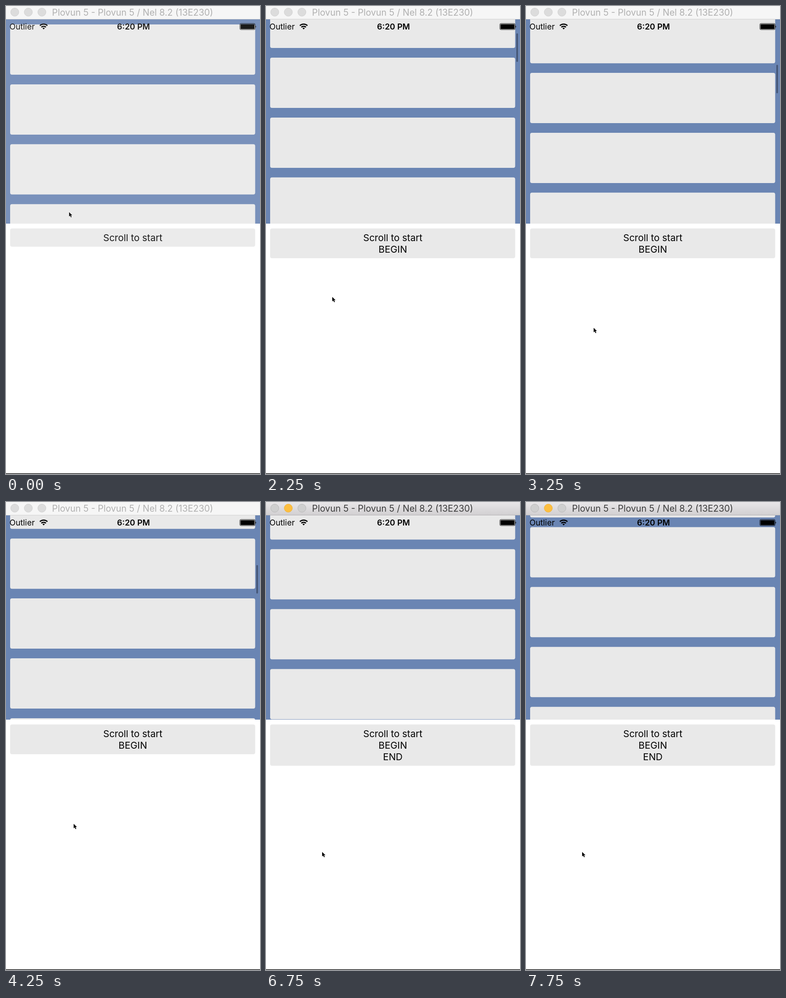
These frames come from a looping animation (552x1015 px, 8000 ms). An HTML page:

```html
<!DOCTYPE html>
<html lang="en">
<head>
<meta charset="utf-8">
<title>Scroll begin and end</title>
<style>
  html, body { margin: 0; width: 100%; height: 100%; overflow: hidden; background: #fff; }
  svg { display: block; width: 552px; height: 1015px; font-family: Inter, "Liberation Sans", sans-serif; }
</style>
</head>
<body>
<svg viewBox="0 0 552 1015">
  <defs>
    <linearGradient id="activeBar" x2="0" y2="1">
      <stop offset="0" stop-color="#e9e7e9"/>
      <stop offset="1" stop-color="#d1cfd1"/>
    </linearGradient>
    <clipPath id="listArea"><rect y="29" width="552" height="443"/></clipPath>
  </defs>
  <rect width="552" height="1015" fill="#fff"/>

  <g clip-path="url(#listArea)">
    <rect y="29" width="552" height="443" fill="#6a85b3"/>
    <g id="cards" fill="#e9e9e9"></g>
    <rect id="thumb" x="544" width="3.6" height="62" rx="1.8" fill="#455676"/>
  </g>

  <rect id="button" x="9" y="482.5" width="532.5" rx="4" fill="#e9e9e9"/>
  <g font-size="20.5" text-anchor="middle">
    <text x="275.6" y="510">Scroll to start</text>
    <text id="begin" x="275.6" y="535">BEGIN</text>
    <text id="end" x="275.6" y="560">END</text>
  </g>

  <g font-size="17.6">
    <text x="7.5" y="51">Outlier</text>
    <text x="277" y="51" font-weight="600" text-anchor="middle">6:20 PM</text>
  </g>
  <g fill="none" stroke="#000" stroke-width="2.6">
    <path d="M73.6 42.6a11.8 11.8 0 0 1 16.4 0M76.8 46a7.2 7.2 0 0 1 10 0"/>
    <path d="M81.8 50.8l-2.5-2.6a3.6 3.6 0 0 1 5 0z" fill="#000" stroke="none"/>
  </g>
  <rect x="508.2" y="38" width="33.2" height="13.3" rx="2.5" fill="none" stroke="#000" stroke-width="0.9"/>
  <rect x="509.6" y="39.4" width="30.4" height="10.5" rx="1"/>
  <path d="M542.3 42.5q2.4 2.2 0 4.6z"/>

  <path id="cursor" d="M0 0V9.8L2.3 7.7 4 11.6 5.8 10.8 4.1 7H7.1Z" stroke="#fff" stroke-width="1.2" paint-order="stroke"/>
  <rect id="veil" y="29" width="552" height="986" fill="#fff"/>

  <rect id="bar" width="552" height="28.5"/>
  <rect id="barEdge" y="28" width="552" height="1"/>
  <g id="lights"></g>
  <text id="title" x="100" y="20.6" font-size="19.5">Plovun 5 - Plovun 5 / Nel 8.2 (13E230)</text>
  <rect y="1013.5" width="552" height="1.5" fill="#222"/>
</svg>
<script>
const LOOP = 8000, STEP = 250, PITCH = 129.9;
const REST = 750.5;                      // where the flicked list stops
const FLICK = 2106, DECAY = 500;         // release time and momentum constant
const RETURN = 6325, RETURN_TIME = 2850; // the list eases back to its start

const el = id => document.getElementById(id);
const set = (node, attrs) => {
  for (const name in attrs) node.setAttribute(name, attrs[name]);
  return node;
};
const add = (parent, tag, attrs) =>
  parent.appendChild(set(document.createElementNS("http://www.w3.org/2000/svg", tag), attrs));
const progress = (t, from, to) => Math.min(1, Math.max(0, (t - from) / (to - from)));
const smooth = p => p * p * (3 - 2 * p);
const quadInOut = p => p < 0.5 ? 2 * p * p : 1 - 2 * (1 - p) ** 2;

for (let i = 0; i < 12; i++)
  add(el("cards"), "rect", { x: 9, y: 40 + i * PITCH, width: 532.5, height: 109, rx: 4 });
const lights = [19, 48.5, 78].map(cx => add(el("lights"), "circle", { cx, cy: 13.3, r: 8.8 }));

const pointerMoves = [
  { from: 0, to: 1500, x: 148, y: 755 },
  { from: 2000, to: 2250, x: 144, y: 631 },
  { from: 2750, to: 3250, x: 147, y: 698 },
  { from: 4250, to: 5750, x: 122, y: 759 }
];

function pointerAt(t) {
  return pointerMoves.reduce((p, move) => {
    const k = smooth(progress(t, move.from, move.to));
    return { x: p.x + (move.x - p.x) * k, y: p.y + (move.y - p.y) * k };
  }, { x: 137, y: 447 });
}

function scrollAt(t) {
  const momentum = 1 - Math.exp(-Math.max(0, t - FLICK) / DECAY);
  const back = quadInOut(progress(t, RETURN, RETURN + RETURN_TIME));
  return REST * (momentum - back);
}

function draw(time) {
  const t = Math.floor(time % LOOP / STEP) * STEP;
  const scroll = scrollAt(t), pointer = pointerAt(t);
  const begun = t > FLICK, ended = t >= 4750, active = t >= 6250;

  set(el("cards"), { transform: `translate(0 ${-scroll})` });
  set(el("thumb"), { y: 33 + scroll * 0.14, opacity: begun && t < 5250 ? 1 : 0 });
  set(el("button"), { height: 39.5 + 25 * (begun + ended) });
  set(el("begin"), { opacity: +begun });
  set(el("end"), { opacity: +ended });
  set(el("cursor"), { transform: `translate(${pointer.x} ${pointer.y})` });
  set(el("veil"), { opacity: t < STEP ? 0.1 : 0 });

  set(el("bar"), { fill: active ? "url(#activeBar)" : "#f6f6f6" });
  set(el("barEdge"), { fill: active ? "#b4b2b4" : "#d4d4d4" });
  set(el("title"), { fill: active ? "#3c3c3c" : "#b1b1b1" });
  lights.forEach((light, i) => {
    const lit = active && i === 1;
    set(light, {
      fill: lit ? "#fdbf40" : active ? "#cfcfcf" : "#dcdcdc",
      stroke: lit ? "#f0b23a" : active ? "#b9b9b9" : "#d0d0d0"
    });
  });
}

const start = performance.now();
function tick() {
  draw(performance.now() - start);
  requestAnimationFrame(tick);
}
tick();
</script>
</body>
</html>
```
